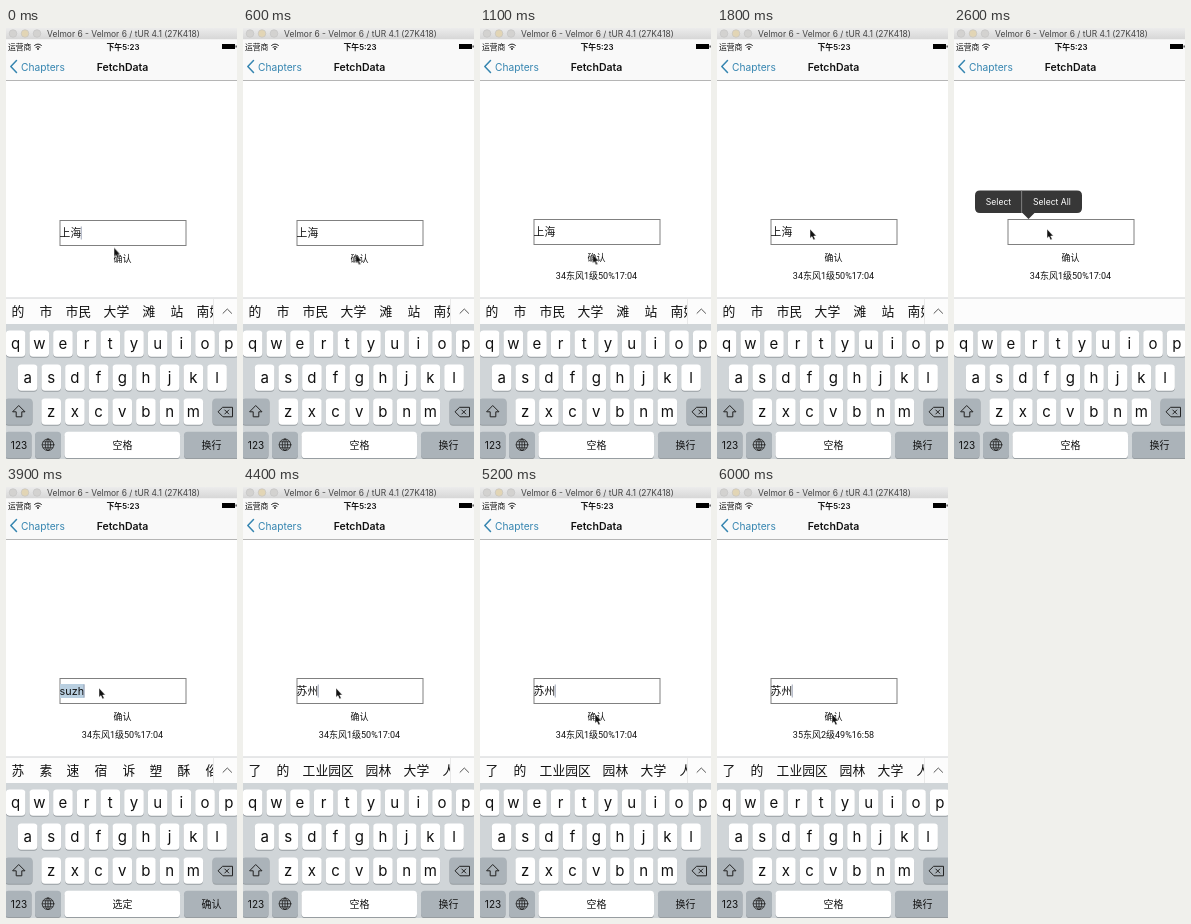
Recreate the animation shown at these times as an HTML page. Size 231x431 px, loop 6.1 s.

```html
<!DOCTYPE html>
<html lang="zh-CN">
<head>
<meta charset="utf-8">
<title>FetchData</title>
<style>
  html, body { margin: 0; width: 100%; height: 100%; overflow: hidden; background: #fff; }
  svg { display: block; width: 231px; height: 431px; }
  text { font-family: Inter, "Noto Sans CJK SC", "Noto Sans CJK", sans-serif; fill: #111; }
  .mid { text-anchor: middle; }
  .body { font: 9px Roboto, "Noto Sans CJK SC", "Noto Sans CJK", sans-serif; }
  .word { font-size: 10.8px; }
  .key { font-size: 15px; }
  .label { font-size: 10px; }
  .hint { font-size: 12.8px; }
  .menu text { font-size: 8.6px; fill: #fff; }
  .line { fill: none; stroke: #222; stroke-width: 1; stroke-linejoin: round; stroke-linecap: round; }

  .pointer { animation: point 6100ms infinite; }
  .menu { animation: menu 6100ms linear infinite; }
  .caret { animation: blink 6100ms step-end infinite; }

  @keyframes point {
    0%, 1.6% { transform: translate(108px, 219.5px); animation-timing-function: ease-out; }
    6.5%, 20.5% { transform: translate(112.5px, 226px); animation-timing-function: ease-in-out; }
    26.2%, 77% { transform: translate(93px, 201px); animation-timing-function: ease-in-out; }
    85.2%, 100% { transform: translate(115px, 227px); }
  }
  @keyframes menu {
    0%, 36% { opacity: 0; }
    38%, 53.2% { opacity: 1; }
    57.8%, 100% { opacity: 0; }
  }
  @keyframes blink {
    0% { opacity: 1; }
    8.9% { opacity: 0; }
    20.4% { opacity: 1; }
    27.8% { opacity: 0; }
    33.5% { opacity: 1; }
    40.9% { opacity: 0; }
    46% { opacity: 1; }
    77% { opacity: 0; }
    85% { opacity: 1; }
    90.9% { opacity: 0; }
    95% { opacity: 1; }
  }
</style>
</head>
<body>
<svg viewBox="0 0 231 431">
  <defs>
    <linearGradient id="chrome" x2="0" y2="1">
      <stop stop-color="#ececec"/><stop offset="1" stop-color="#d6d6d6"/>
    </linearGradient>
    <clipPath id="strip"><rect y="271" width="207" height="25"/></clipPath>
  </defs>
  <rect width="231" height="431" fill="#fff"/>

  <!-- window bar -->
  <rect width="231" height="11.5" fill="url(#chrome)"/>
  <g stroke="#c2c2c2" stroke-width=".6">
    <circle cx="7" cy="5.5" r="3.8" fill="#d3d2d0"/>
    <circle cx="19" cy="5.5" r="3.8" fill="#e2d5b5"/>
    <circle cx="31" cy="5.5" r="3.8" fill="#d3d2d0"/>
  </g>
  <text class="mid" x="117.5" y="8.7" font-size="8.45" style="fill:#444">Velmor 6 - Velmor 6 / tUR 4.1 (27K418)</text>

  <!-- status and navigation -->
  <rect y="11.5" width="231" height="40.5" fill="#f9f9f9"/>
  <rect y="52" width="231" height="1" fill="#b5b5b5"/>
  <text x="2" y="21.6" font-size="7.8">运营商</text>
  <path class="line" d="M28.6 17.4q3.4-2.8 6.8 0M30 19.2q2-1.6 4 0"/>
  <circle cx="32" cy="20.9" r=".9"/>
  <text class="mid" x="117" y="21.8" font-size="7.9" font-weight="600">下午5:23</text>
  <path d="M216 16h13v5h-13zM229.6 17.5h1v2h-1z"/>
  <path class="line" d="M10.5 32.5 4.8 38.5l5.7 6" style="stroke:#3585b0;stroke-width:1.5"/>
  <text x="15" y="42.6" font-size="10.2" style="fill:#3585b0">Chapters</text>
  <text class="mid" x="116.5" y="42.5" font-size="10.5" font-weight="600">FetchData</text>

  <!-- form -->
  <g id="form">
    <rect x="54" y="191.5" width="126" height="25" fill="#fff" stroke="#808080"/>
    <rect id="mark" x="54" y="197" height="14" fill="#b9cfe0"/>
    <text id="word" class="word" x="53.6" y="207.8"></text>
    <rect id="caret" class="caret" y="197.5" width=".8" height="13" fill="#8890a6"/>
    <text class="mid body" x="116.5" y="233.3">确认</text>
  </g>
  <text id="result" class="mid body" x="116.5" y="250.5"></text>

  <g class="menu">
    <path d="M26 162.5h97q5 0 5 5v12.5q0 5-5 5H80.5l-6 6-6-6H26q-5 0-5-5v-12.5q0-5 5-5z" fill="#373737"/>
    <rect x="67.2" y="162.5" width=".9" height="22.5" fill="#888"/>
    <text class="mid" x="44.5" y="177">Select</text>
    <text class="mid" x="98" y="177">Select All</text>
  </g>

  <!-- suggestions -->
  <rect y="270" width="231" height="26" fill="#fcfcfc"/>
  <rect y="269.5" width="231" height="1" fill="#d0d2d4"/>
  <g id="bar">
    <g id="hints" clip-path="url(#strip)"></g>
    <rect x="207" y="271" width=".6" height="25" fill="#ddd"/>
    <path class="line" d="M217 285.3l4.3-4.3 4.3 4.3" style="stroke:#555"/>
  </g>

  <!-- keyboard -->
  <rect y="296" width="231" height="135" fill="#d0d5d8"/>
  <g id="keys"></g>
  <path class="line" d="M13 377.8l6 6h-3.2v5h-5.6v-5H7z"/>
  <path class="line" d="M217 379.3h9.5v9.5H217l-4.7-4.75zM218.8 382l4 4m0-4-4 4"/>
  <g class="line" style="stroke-width:.8">
    <circle cx="42" cy="416.8" r="5.8"/>
    <ellipse cx="42" cy="416.8" rx="2.7" ry="5.8"/>
    <path d="M36.2 416.8h11.6M42 411v11.6M37.2 413.8h9.6M37.2 419.8h9.6"/>
  </g>
  <text class="mid label" x="13" y="420.6">123</text>
  <text id="space" class="mid label" x="116.5" y="420.8"></text>
  <text id="enter" class="mid label" x="205.5" y="420.8"></text>

  <path class="pointer" d="M0 0v9.3l2-1.7 1.5 3.4 1.7-.8-1.5-3.2h2.7z" fill="#111" stroke="#fff" stroke-width=".5"/>
</svg>
<script>
const NS = 'http://www.w3.org/2000/svg';
const LOOP = 6100;
const $ = id => document.getElementById(id);

function add(parent, tag, attrs, text = '') {
  const el = document.createElementNS(NS, tag);
  for (const k in attrs) el.setAttribute(k, attrs[k]);
  el.textContent = text;
  parent.append(el);
  return el;
}

function key(x, y, width, fill = '#fff') {
  const box = { x, width, height: 26.3, rx: 3.6 };
  add($('keys'), 'rect', { ...box, y: y + 1, fill: '#979da1' });
  add($('keys'), 'rect', { ...box, y, fill });
}

[['qwertyuiop', -0.2, 302.4], ['asdfghjkl', 11.8, 336.4], ['zxcvbnm', 35.4, 370.4]].forEach(([row, left, y]) => {
  [...row].forEach((ch, i) => {
    const x = left + 23.68 * i;
    key(x, y, 19.6);
    add($('keys'), 'text', { class: 'key mid', x: x + 9.8, y: y + 18.1 }, ch);
  });
});
const GREY = '#abb3b9';
key(-1, 370.4, 27.5, GREY);
key(206.5, 370.4, 27, GREY);
key(-1, 403.7, 26.5, GREY);
key(29, 403.7, 26, GREY);
key(58.5, 403.7, 115.5);
key(178, 403.7, 56, GREY);

const TILES = { '^': '⬆', '#': '3' };
const WIDE = [6, 34, 61, 89, 117, 144, 172, 200];
const HINTS = {
  none: ['', []],
  shanghai: ['的 市 市民 大学 滩 站 南娱', [6, 34, 60, 98, 137, 165, 191]],
  s: ['是 说 上 ^ 三 # 时 谁', WIDE],
  su: ['苏 素 速 宿 诉 塑 酥 俗', WIDE],
  city: ['苏州 宿州 苏 素 速 宿', [6, 46, 86, 114, 142, 170]],
  suzhou: ['了 的 工业园区 园林 大学 人', [6, 34, 60, 123, 161, 200]]
};

function tile(x, sign) {
  add($('hints'), 'rect', { x, y: 276.5, width: 13, height: 13, rx: 2, fill: '#7d9db5' });
  if (sign === '^') {
    add($('hints'), 'path', { d: `M${x + 6.5} 278.5l4 4.3h-2.3v4.2h-3.4v-4.2h-2.3z`, fill: '#fff' });
  } else {
    add($('hints'), 'text', { class: 'mid', x: x + 6.5, y: 286.6, 'font-size': 10, 'font-weight': 700, style: 'fill:#fff' }, TILES[sign]);
  }
}

let shown;
function setHints(name) {
  if (name === shown) return;
  shown = name;
  $('hints').textContent = '';
  $('bar').style.display = name === 'none' ? 'none' : '';
  const [words, xs] = HINTS[name];
  xs.forEach((x, i) => {
    const word = words.split(' ')[i];
    if (TILES[word]) tile(x, word);
    else add($('hints'), 'text', { class: 'hint', x: x - 0.4, y: 287.6 }, word);
  });
}

// Latest value whose start time has passed
const at = (steps, t) => steps.filter(s => s[0] <= t).pop()[1];

const WORDS = [[0, '上海'], [2350, '上'], [2450, ''], [2950, 's'], [3250, 'su'],
  [3650, 'suz'], [3800, 'suzh'], [3950, 'suzho'], [4050, 'suzhou'], [4250, '苏州']];
const BARS = [[0, 'shanghai'], [2350, 'none'], [3050, 's'], [3450, 'su'], [4050, 'city'], [4250, 'suzhou']];
const RESULTS = [[0, ''], [650, '34东风1级50%17:04'], [5650, '35东风2级49%16:58']];

function draw(now) {
  const t = Math.max(0, now - start) % LOOP;
  const word = at(WORDS, t);
  const result = at(RESULTS, t);
  const typing = t >= 2950 && t < 4250;

  $('word').textContent = word;
  const width = word ? $('word').getComputedTextLength() : 0;
  $('caret').setAttribute('x', 53.6 + Math.max(width, 0.8) - 0.4);
  $('mark').setAttribute('width', typing ? width : 0);
  $('result').textContent = result;
  $('form').setAttribute('transform', `translate(0 ${result ? 0 : 1})`);
  $('space').textContent = typing ? '选定' : '空格';
  $('enter').textContent = typing ? '确认' : '换行';
  setHints(at(BARS, t));
  requestAnimationFrame(draw);
}

const start = performance.now();
draw(start);
</script>
</body>
</html>
```
